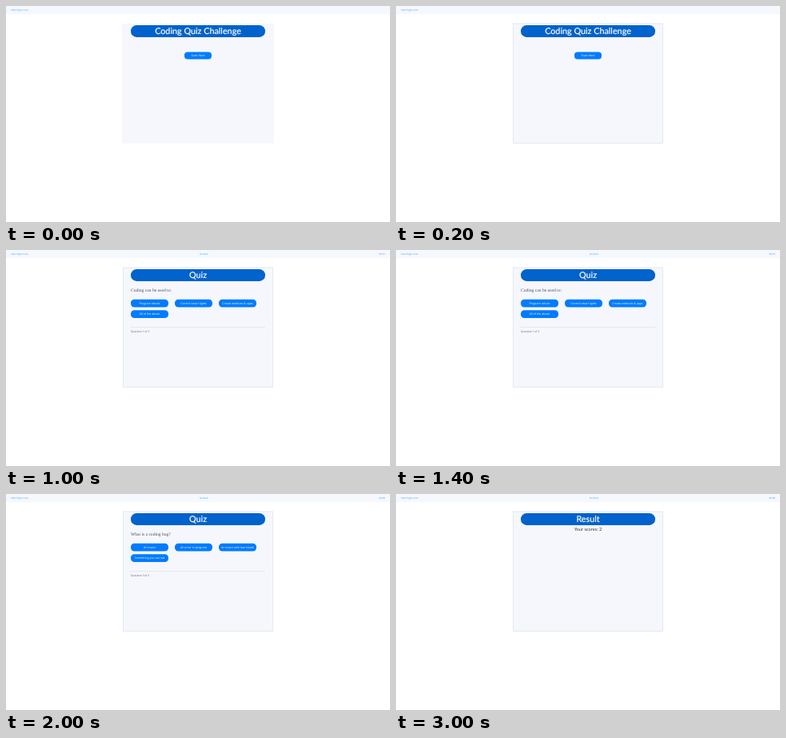
These frames come from a looping animation (480x270 px, 3990 ms). An HTML page:

```html
<!DOCTYPE html>
<html lang="en">
<head>
<meta charset="utf-8">
<title>Coding quiz</title>
<style>
  html, body { margin: 0; width: 100%; height: 100%; overflow: hidden; background: #fff; }
  svg { display: block; width: 100%; height: 100%; }
  text { font: 3.55px "Open Sans", "Noto Sans", sans-serif; text-rendering: geometricPrecision; }
  .nav { font-size: 2.9px; fill: #3f9aff; }
  .title { font: 10.8px Lato, sans-serif; fill: #fff; stroke: #fff; stroke-width: .2px; }
  .ask { font: 5.57px "Liberation Serif", serif; fill: #4a4f55; }
  .label { fill: #fff; }
  .count { font-size: 3.25px; fill: #555b61; }
  .score { font: 5.7px Lato, sans-serif; fill: #343a40; }
</style>
</head>
<body>
<svg id="stage" viewBox="0 0 480 270"></svg>
<script>
const LOOP = 3990;
const stage = document.getElementById("stage");

const text = (cls, x, y, s, anchor = "middle") =>
  `<text class="${cls}" x="${x}" y="${y}" text-anchor="${anchor}">${s}</text>`;

const rect = (x, y, w, h, fill, r = 0) =>
  `<rect x="${x}" y="${y}" width="${w}" height="${h}" rx="${r}" fill="${fill}"/>`;

const button = (x, y, w, h, s) =>
  rect(x, y, w, h, "#007bff", h * .45) + text("label", x + w / 2, y + h / 2 + 1.25, s);

const title = s => rect(156, 24, 168, 15, "#0062cc", 7.3) + text("title", 240, 35.2, s);

const nav = clock =>
  text("nav", 247.5, 6.2, "Go Back") + text("nav", 474, 6.2, clock, "end");

const question = (clock, ask, answers, n) =>
  nav(clock) + title("Quiz") + text("ask", 156, 52, ask, "start") +
  answers.map((s, i) =>
    button(156 + i % 3 * 55, i < 3 ? 61.7 : 75.2, 47, 9.8, s)).join("") +
  rect(156, 96, 168, .6, "#dcdfe4") +
  text("count", 156, 103.1, `Question ${n} of 3`, "start");

// start time of each screen and its content
const screens = [
  [0, title("Coding Quiz Challenge") + button(223, 57.5, 34, 9, "Start Here")],
  [1000, question("00:15", "Coding can be used to:",
    ["Program robots", "Control smart lights", "Create websites &amp; apps", "All of the above"], 1)],
  [2000, question("00:08", "What is a coding bug?",
    ["An insect", "An error in program", "An insect with two heads", "Something you can eat"], 3)],
  [3000, nav("00:08") + title("Result") + text("score", 240, 46.1, "Your scores: 2")]
];

const panel = framed => framed
  ? `<rect x="146.5" y="22" width="187" height="149.3" fill="#f5f7fc" stroke="#dce4ec" stroke-width=".8"/>`
  : rect(145.3, 22, 189.4, 149.8, "#f5f7fc");

function draw(t) {
  const body = screens.filter(s => t >= s[0]).pop()[1];
  return rect(0, 0, 480, 10.3, "#f5f8fd") +
    text("nav", 6, 6.2, "View Highscores", "start") + panel(t >= 70) + body;
}

let shown = "";
function tick() {
  const next = draw(performance.now() % LOOP);
  if (next !== shown) stage.innerHTML = shown = next;
  requestAnimationFrame(tick);
}
tick();
</script>
</body>
</html>
```
